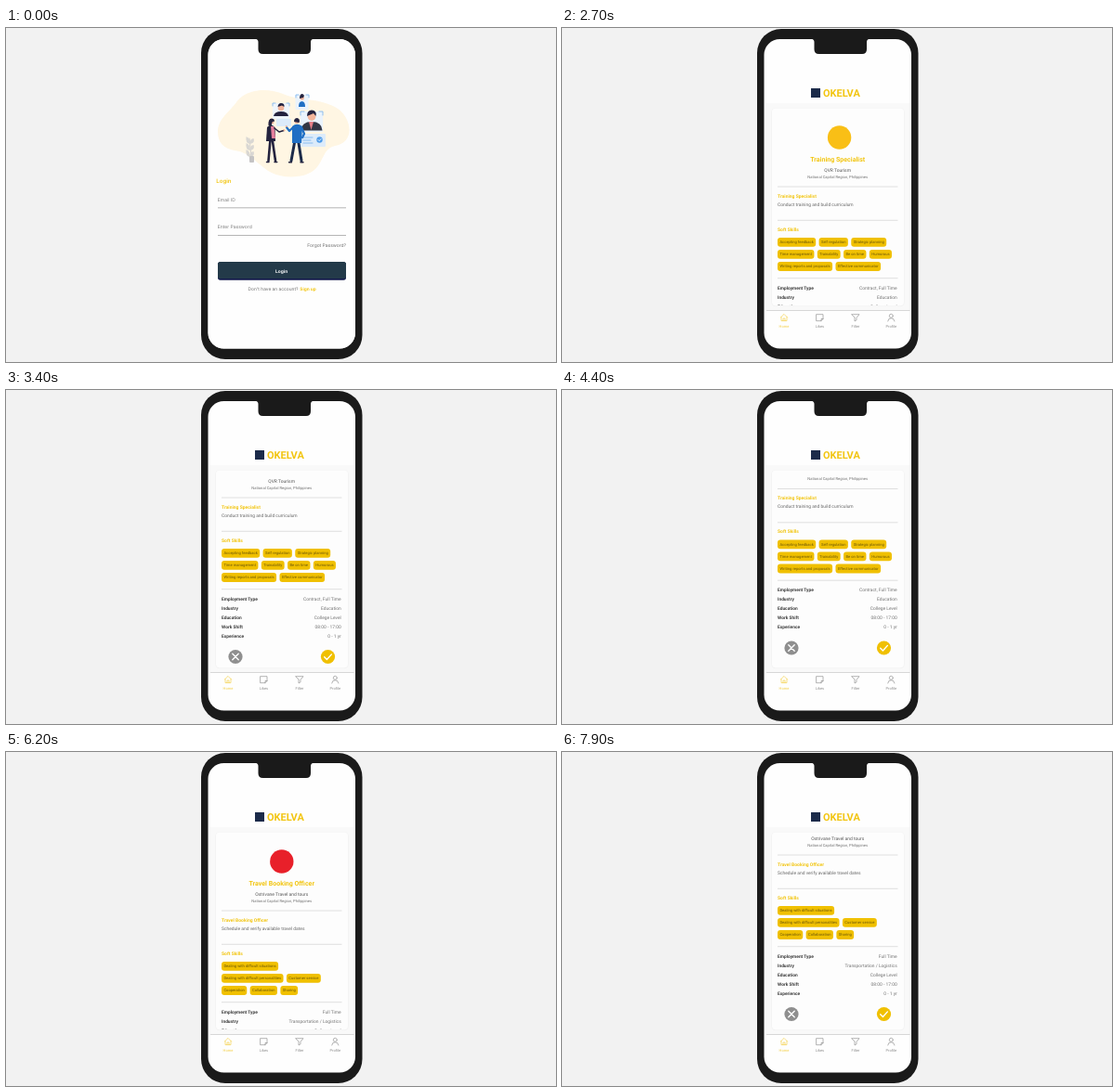
Recreate the animation shown at these times as an HTML page. Size 592x360 px, loop 8 s.

```html
<!DOCTYPE html>
<html lang="en">
<head>
<meta charset="utf-8">
<title>Job app walkthrough</title>
<style>
  html, body { margin: 0; width: 100%; height: 100%; overflow: hidden; background: #f2f2f2; }
  svg { display: block; width: 592px; height: 360px; }
  text { font-family: Roboto, Inter, sans-serif; text-rendering: geometricPrecision; }
  #login text { font-family: Inter, Roboto, sans-serif; }
</style>
</head>
<body>
<svg id="stage" viewBox="0 0 592 360" xmlns="http://www.w3.org/2000/svg">
  <defs>
    <clipPath id="screen"><rect x="217.5" y="12" width="158.5" height="333.5" rx="17"/></clipPath>
    <clipPath id="inner"><rect x="226" y="91" width="142" height="208"/></clipPath>
  </defs>
  <rect width="592" height="360" fill="#f2f2f2"/>
  <rect x="210" y="1" width="173.5" height="356" rx="26" fill="#1a1a1a"/>
  <g clip-path="url(#screen)">
    <rect x="217" y="12" width="160" height="334" fill="#fefefe"/>
    <g id="home"></g>
    <g id="cards"></g>
    <g id="login"></g>
  </g>
  <path d="M268 11.5 Q271.5 12 271.5 15 V23 Q271.5 28 276.5 28 H323 Q328 28 328 23 V15 Q328 12 331.5 11.5 Z" fill="#1a1a1a"/>
</svg>
<script>
const YELLOW = '#f2c510', DARK = '#3c3c3c', GREY = '#727272', NAVY = '#1c2b4a', BLUE = '#1f6fc4';
const LOOP = 8000, STEP = 100;
const $ = id => document.getElementById(id);

// Text is centred vertically on y.
function text(str, x, y, size, fill, { anchor = 'start', weight = 400 } = {}) {
  return `<text x="${x}" y="${y + size * 0.35}" font-size="${size}" fill="${fill}" ` +
    `text-anchor="${anchor}" font-weight="${weight}">${str}</text>`;
}
const rect = (x, y, w, h, fill, rx = 0) =>
  `<rect x="${x}" y="${y}" width="${w}" height="${h}" rx="${rx}" fill="${fill}"/>`;
const circle = (x, y, r, fill) => `<circle cx="${x}" cy="${y}" r="${r}" fill="${fill}"/>`;
const path = (d, fill, more = '') => `<path d="${d}" fill="${fill}" ${more}/>`;
const line = (d, stroke, width) =>
  path(d, 'none', `stroke="${stroke}" stroke-width="${width}" stroke-linecap="round" stroke-linejoin="round"`);
const rule = (x1, x2, y, stroke) => path(`M${x1} ${y}H${x2}`, 'none', `stroke="${stroke}" stroke-width=".8"`);
const mid = { anchor: 'middle' };

function drawHome() {
  const tabs = [
    ['Home', 239, 'M235.4 312 L239 308.4 L242.6 312 M236 311.5 V315.6 H242 V311.5 M238 315.6 V313 H240 V315.6'],
    ['Likes', 277.5, 'M274 308.7 H281 V313.5 L279 315.7 H274 Z M281 313.5 H279 V315.7'],
    ['Filter', 316, 'M312 308.7 H320 L317 312.4 V314.8 L315 316 V312.4 Z'],
    ['Profile', 354.3, 'M356.3 310.3 a2 2 0 1 0 -4 0 a2 2 0 1 0 4 0 M350.7 316 Q351 312.8 354.3 312.8 Q357.6 312.8 357.9 316']
  ];
  $('home').innerHTML =
    rect(219.5, 81, 155, 223, '#f9f9f9') +
    rect(268, 65, 10, 10, NAVY) +
    text('OKELVA', 281, 70, 11, YELLOW, { weight: 700 }) +
    rule(220, 374.5, 304.5, '#cdcdcd') +
    tabs.map(([label, x, icon], i) => {
      const color = i ? '#8c8c8c' : '#f4cf45';
      return line(icon, color, 0.65) + text(label, x, 322, 4, color, mid);
    }).join('');
}

function drawCard(id, job) {
  const rows = [
    ['Employment Type', job.type], ['Industry', job.industry], ['Education', 'College Level'],
    ['Work Shift', '08:00 - 17:00'], ['Experience', '0 - 1 yr']
  ];
  const body =
    circle(job.x, 118, 12.7, job.color) +
    text(job.title, 296.7, 141.5, 7.05, YELLOW, { anchor: 'middle', weight: 600 }) +
    text(job.company, 296.7, 153, 4.95, '#555', mid) +
    text('National Capital Region, Philippines', 296.7, 160.3, 4.13, GREY, mid) +
    [171, 207.3, 269.7].map(y => rule(232, 361.5, y, '#d9d9d9')).join('') +
    text(job.title, 232, 181, 5, YELLOW, { weight: 600 }) +
    text(job.about, 232, 190, 4.93, '#666') +
    text('Soft Skills', 232, 217.2, 5, YELLOW, { weight: 600 }) +
    '<g class="chips"></g>' +
    rows.map(([k, v], i) =>
      text(k, 232, 280 + i * 10, 4.85, DARK, { weight: 600 }) +
      text(v, 360.7, 280 + i * 10, 4.9, GREY, { anchor: 'end' })).join('') +
    circle(247, 342.5, 7.6, '#8f8f8f') + line('M243.8 339.3l6.4 6.4m0-6.4l-6.4 6.4', '#fff', 1.4) +
    circle(346.5, 342.5, 7.6, '#f0c000') + line('M342.7 342.8l2.7 2.7 5-5.6', '#fff', 1.4);

  $('cards').insertAdjacentHTML('beforeend',
    `<g id="${id}">` +
    rect(225.3, 86, 143.4, 214.2, '#f3f3f3', 4.5) + rect(226, 86.5, 142, 212.8, '#fdfdfd', 4) +
    `<g clip-path="url(#inner)"><g class="body">${body}</g></g></g>`);
  layChips(document.querySelector(`#${id} .chips`), job.skills);
}

function layChips(group, rows) {
  rows.forEach((row, i) => {
    let x = 232;
    const y = 230.8 + i * 13.1;
    for (const label of row) {
      group.insertAdjacentHTML('beforeend', text(label, x + 2.4, y, 4.13, '#6b560a'));
      const w = group.lastChild.getComputedTextLength() + 4.8;
      group.lastChild.insertAdjacentHTML('beforebegin', rect(x, y - 4.9, w, 9.8, '#f0c000', 3));
      x += w + 3.4;
    }
  });
}

function drawLogin() {
  const skin = '#f3b59b', hair = '#24233f', pale = '#dcebfa';
  const art =
    path('M228 112 C228 98 240 91 248 80 C258 66 280 64 298 71 C314 78 330 76 344 81 C356 85 362 89 366 97 ' +
      'C373 110 370 124 354 127 C342 130 342 142 334 151 C324 162 300 163 286 156 C272 149 264 134 246 132 C234 130 228 123 228 112Z', '#fff6e3') +
    // plant
    line('M264.5 144L262 119', '#d3d1cd', 1) +
    [119, 126, 133].map(y => path(`M262.5 ${y + 6}q-5-1-4-8q5 2 4 8q0-6 4-6q2 5-4 6Z`, '#d9d7d3')).join('') +
    rect(262, 138, 5, 7, '#c4c3c4', 1) +
    // profile panels
    rect(287, 81, 18, 17, '#eef5fc', 1) + rect(291, 98, 16, 8, pale, 1) +
    path('M288 95 Q289 90 296 90 Q303 90 304 95Z', hair) + circle(296, 86, 3.3, skin) +
    path('M292.5 85 Q293 81 296 81 Q300 81 299.5 85 L297 83.5Z', hair) +
    rect(311.5, 72, 14, 16, '#eaf3fc', 1) + path('M315 85 Q315 79 318.5 79 Q322 79 322 85Z', BLUE) +
    circle(318.7, 75.5, 2.2, skin) + path('M316 76 Q316 71 319 71 Q322 72 320 75Z', hair) +
    rect(317, 90, 24, 22, '#eaf3fc', 1) + rect(316, 114, 28, 14, pale, 1) +
    path('M317.5 110.5 Q318 101 329 101 Q340 101 340.5 110.5Z', '#333745') + path('M326 101h5l-2.5 9Z', '#e57f87') +
    circle(329, 95.5, 4.4, skin) + path('M324 95 Q324 88.5 329 88.5 Q335 89 333.5 95 L331 92Z', hair) +
    line('M287 84v-3h3m12 0h3v3M312 75v-3h3m8 0h3v3M317 94v-4h4m16 0h4v4M320 118h10m-10 3h8m-8 3h10', '#75b0ec', 0.8) +
    circle(337.5, 120.5, 3.2, '#4e9be8') + line('M336 120.5l1.2 1.2 2-2.3', '#fff', 0.8) +
    // standing pair
    line('M284.5 120 L282.5 143 M286.5 119 L290 143', hair, 2.6) + line('M280.5 144.5h2.5m6 0h2.8', hair, 1.4) +
    path('M281 107 Q285 102 289.5 107 L290 122 H280Z', hair) + path('M285 106h3.5l1.5 13h-4Z', '#e57f9d') +
    line('M289 108 L294 112 L299 110.5', hair, 1.6) + circle(299.5, 110.3, 1, skin) +
    circle(286, 101, 2.5, skin) + path('M282.5 105 Q282 97.5 286 97.5 Q290 98 288.5 101 Q286 100 286 105Z', hair) +
    line('M311 121 L307 143 M314.5 121 L318 143', NAVY, 3) + line('M304.5 144.7h3m9.5 0h3', hair, 1.4) +
    path('M308 106 Q313 101.5 319 106 L318 124 H308Z', BLUE) +
    line('M309 107 L305 111 L302 107', BLUE, 2.2) + line('M318 107 L321 114 L319 118', BLUE, 2.3) +
    circle(301.7, 106, 1, skin) + circle(313, 100.8, 2.5, skin) + path('M310 101 Q310 97 313.5 97 Q317 98 315.5 102Z', hair);

  const soft = '#7f7f7f';
  $('login').innerHTML =
    rect(217, 12, 160, 334, '#fefefe') + art +
    text('Login', 226.3, 164.5, 6.1, YELLOW, { weight: 600 }) +
    text('Email ID', 227.8, 184.9, 5, soft) + rule(228, 366, 193.8, '#a2a2a2') +
    text('Enter Password', 227.8, 214.7, 5, soft) + rule(228, 366, 223.5, '#a2a2a2') +
    text('Forgot Password?', 366, 234.2, 4.95, '#6d6d6d', { anchor: 'end' }) +
    rect(228, 252.3, 138, 19.4, '#12194a', 2.6) + rect(228, 252, 138, 18, '#233a49', 2.6) +
    text('Login', 296.7, 261.8, 4.9, '#fff', { anchor: 'middle', weight: 700 }) +
    text("Don't have an account?", 314.5, 281, 4.85, '#6d6d6d', { anchor: 'end' }) +
    text('Sign up', 316.3, 281, 4.75, YELLOW, { weight: 700 });
}

const ramp = (t, a, b) => Math.min(1, Math.max(0, (t - a) / (b - a)));

// Scroll distance after the drag starts: [ms, px]
const SCROLL = [[0, 0], [100, 0], [300, 11], [800, 55], [1000, 60], [1100, 64.5]];
function scrollAt(t) {
  if (t <= 0) return 0;
  const i = SCROLL.findIndex(([ms]) => ms >= t);
  if (i < 0) return SCROLL.at(-1)[1];
  const [a, from] = SCROLL[i - 1], [b, to] = SCROLL[i];
  return from + (to - from) * ramp(t, a, b);
}

function pose(id, opacity, scroll, away = 0) {
  const card = $(id);
  card.style.display = opacity > 0 && away < 1 ? '' : 'none';
  card.setAttribute('opacity', opacity);
  card.setAttribute('transform', `translate(${away * 185} 0) rotate(${away * 10} 297 193)`);
  card.querySelector('.body').setAttribute('transform', `translate(0 ${-scroll})`);
}

// Sign in, first card loads, scrolls and is accepted, second card loads and scrolls.
function render(t) {
  const login = 1 - ramp(t, 2000, 2400);
  $('login').style.display = login > 0 ? '' : 'none';
  $('login').setAttribute('opacity', login);
  pose('first', ramp(t, 2500, 2700), scrollAt(t - 2600), ramp(t, 4700, 5100));
  pose('second', ramp(t, 5700, 6000), scrollAt(t - 6900));
}

drawHome();
drawCard('first', {
  title: 'Training Specialist', company: 'QVR Tourism', about: 'Conduct training and build curriculum',
  type: 'Contract, Full Time', industry: 'Education', color: '#f9bf16', x: 298.6,
  skills: [
    ['Accepting feedback', 'Self regulation', 'Strategic planning'],
    ['Time management', 'Trainability', 'Be on time', 'Humorous'],
    ['Writing reports and proposals', 'Effective communicator']
  ]
});
drawCard('second', {
  title: 'Travel Booking Officer', company: 'Ostrivane Travel and tours', about: 'Schedule and verify available travel dates',
  type: 'Full Time', industry: 'Transportation / Logistics', color: '#e8202a', x: 296.8,
  skills: [
    ['Dealing with difficult situations'],
    ['Dealing with difficult personalities', 'Customer service'],
    ['Cooperation', 'Collaboration', 'Sharing']
  ]
});
drawLogin();

const start = performance.now();
function tick() {
  const t = (performance.now() - start) % LOOP;
  render(Math.floor(t / STEP) * STEP);
  requestAnimationFrame(tick);
}
tick();
</script>
</body>
</html>
```
